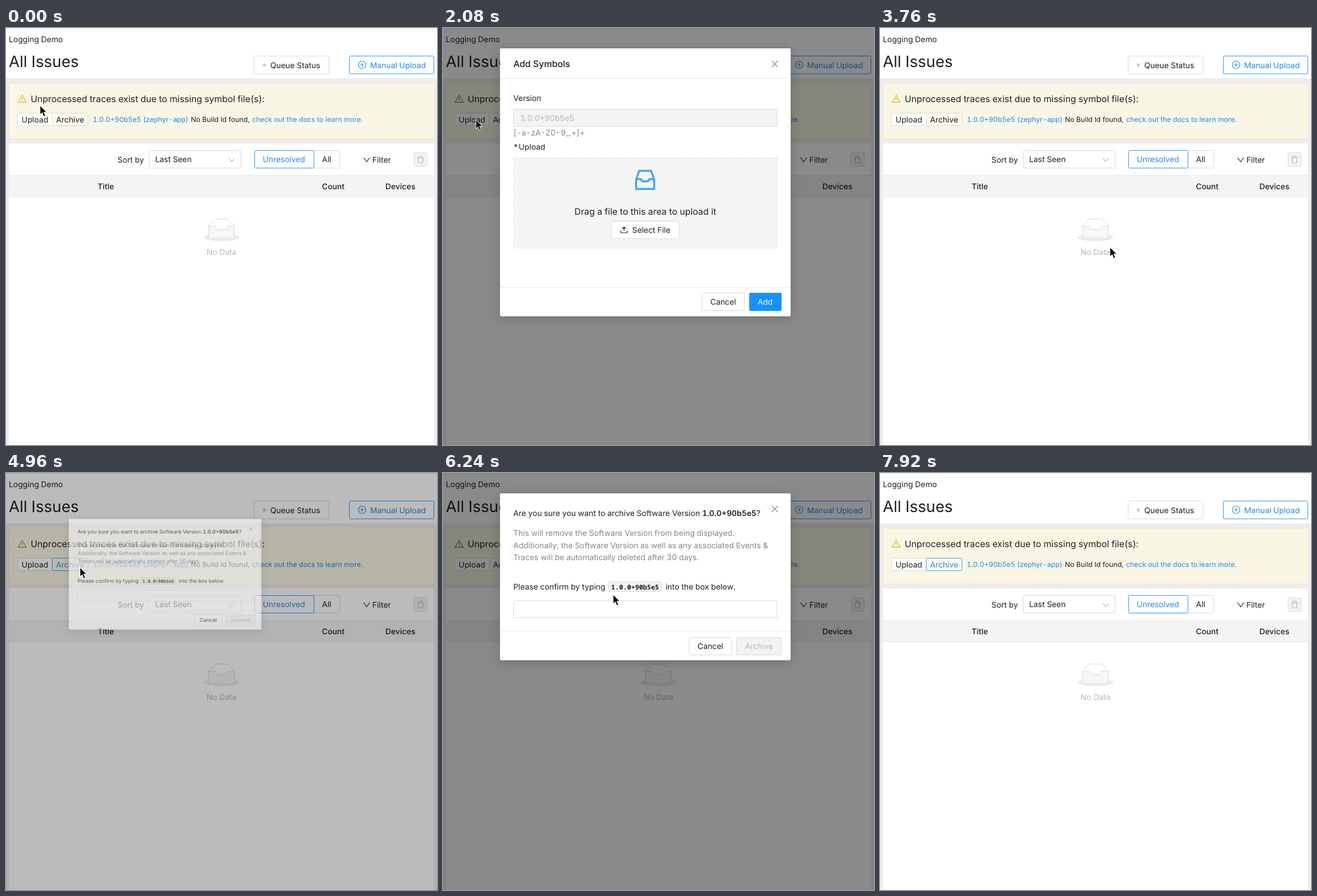
An HTML page that plays this animation: 760x737 px, repeating every 8 s.

```html
<!DOCTYPE html>
<html lang="en">
<head>
<meta charset="utf-8">
<title>All Issues</title>
<style>
html, body { margin: 0; height: 100%; overflow: hidden; }
svg { display: block; }
text {
  font: 13.85px Inter, sans-serif; font-optical-sizing: none; font-variant-numeric: tabular-nums;
  fill: #1f1f1f; text-rendering: geometricPrecision; white-space: pre;
}
.h1 { font-size: 27.6px; }
.big { font-size: 15.8px; }
.small { font-size: 12.35px; }
.medium { font-weight: 500; }
.mid { text-anchor: middle; }
.blue { fill: #1f8ae8; }
.grey { fill: #858585; }
.pale { fill: #b8b8b8; }
.white { fill: #fff; }
.line { fill: none; stroke: #222; stroke-width: 1.2; }
.box { fill: #fff; stroke: #d9d9d9; }
.off { fill: #f3f3f3; stroke: #d9d9d9; }
.primary { stroke: #2b93ee; }
.rule { stroke: #e8e8e8; }
.btn { --h: 0; }
.btn rect { stroke: color-mix(in srgb, #40a0f5 calc(var(--h) * 100%), #d9d9d9); }
.btn text { fill: color-mix(in srgb, #2b8fea calc(var(--h) * 100%), #1f1f1f); }
.warn { fill: none; stroke: color-mix(in srgb, #777 calc(var(--m) * 100%), #e0b62c); stroke-width: 1.3; }
.code { font: bold 11.7px "Noto Sans Mono", monospace; }
.sheet { fill: #fff; filter: drop-shadow(0 4px 10px #0003); }
</style>
</head>
<body>
<svg id="stage" width="760" height="737" viewBox="0 0 760 737">
  <rect width="760" height="737" fill="#ededed"/>
  <rect y="1.5" width="760" height="87.5" fill="#fff"/>
  <text x="5" y="25">Logging Demo</text>
  <text class="h1" x="5" y="69">All Issues</text>
  <rect class="box" x="437.5" y="49.5" width="132" height="31.5" rx="2"/>
  <circle cx="455.5" cy="65.5" r="3" fill="#d0d0d0"/>
  <text x="466" y="70.5">Queue Status</text>
  <rect class="box primary" x="605.5" y="49.5" width="149" height="31.5" rx="2"/>
  <path class="line primary" d="M621.5 65a6.5 6.5 0 1 0 13 0a6.5 6.5 0 1 0-13 0M624.7 65h6.6M628 61.7v6.6"/>
  <text class="blue" x="642" y="70.5">Manual Upload</text>

  <rect x="5.5" y="97.5" width="749.5" height="98.5" rx="2" fill="#f9f6e5" stroke="#f1e8bd"/>
  <path class="warn" d="M28.5 118.7L35.6 131.3H21.4ZM28.5 123v4M28.5 128v1.5"/>
  <text class="big" x="43.5" y="131">Unprocessed traces exist due to missing symbol file(s):</text>
  <g class="btn" id="upload">
    <rect x="20.5" y="150.5" width="61" height="22" rx="2" fill="#fff"/>
    <text class="mid" x="51" y="166.5">Upload</text>
  </g>
  <g class="btn" id="archive">
    <rect x="81.5" y="150.5" width="63" height="22" rx="2" fill="#faf8ee"/>
    <text class="mid" x="113" y="166.5">Archive</text>
  </g>
  <text class="small blue" x="153" y="166">1.0.0+90b5e5 (zephyr-app)</text>
  <text class="small" x="326" y="166">No Build Id found,</text>
  <text class="small blue" x="434" y="166">check out the docs to learn more.</text>

  <rect x="5.5" y="204" width="749" height="533" fill="#fff"/>
  <text x="196.5" y="237.5">Sort by</text>
  <rect class="box" x="252.5" y="216.5" width="162" height="31" rx="2"/>
  <text x="263" y="237">Last Seen</text>
  <path class="line" style="stroke:#b5b5b5" d="M393 230l5 6.5l5-6.5"/>
  <rect class="box" x="542.5" y="216.5" width="46" height="31" rx="2"/>
  <rect class="box primary" x="438.5" y="216.5" width="104.5" height="31" rx="2"/>
  <text class="blue mid" x="490" y="237">Unresolved</text>
  <text class="mid" x="565.5" y="237">All</text>
  <path class="line" d="M630.5 229l5.5 7.5l5.5-7.5"/>
  <text x="646" y="237.5">Filter</text>
  <rect class="off" x="719.5" y="220.5" width="23" height="24" rx="2"/>
  <path class="line" style="stroke:#b8b8b8" d="M725 229.5h12M726.5 229.5l.8 9h7.4l.8-9M728.5 229v-2.5h5v2.5"/>
  <rect x="5.5" y="260.5" width="749" height="38" fill="#f4f4f4"/>
  <path class="rule" d="M5.5 260.5h749M5.5 298.5h749"/>
  <text class="medium" x="161.5" y="284.5">Title</text>
  <text class="medium" x="557" y="284.5">Count</text>
  <text class="medium" x="669" y="284.5">Devices</text>
  <g transform="translate(348.5 337.5) scale(.985)" stroke="#d9d9d9">
    <ellipse cx="32" cy="33" rx="32" ry="7" fill="#ededed" stroke="none"/>
    <path fill="#fff" d="M55 13L45 1.3Q44 0 43 0H21Q20 0 19 1.3L9 13V22H55Z"/>
    <path fill="#f7f7f7" d="M41.6 16q0-3 2.3-3H55V31q0 4-3 4H12q-3 0-3-4V13H20q2.4 0 2.4 3t2.2 2.9H39.4q2.2 0 2.2-2.9Z"/>
  </g>
  <text class="pale mid" x="380" y="401">No Data</text>

  <rect id="mask" width="760" height="737"/>

  <g id="addDialog">
    <rect class="sheet" x="100.5" y="36" width="512.5" height="473.5" rx="2"/>
    <path class="rule" d="M100.5 89.5h512.5M100.5 458.5h512.5"/>
    <path class="line" style="stroke:#888" d="M580 58l10.5 11M590.5 58l-10.5 11"/>
    <text class="big medium" x="124" y="68.5">Add Symbols</text>
    <text x="124" y="129">Version</text>
    <rect class="off" x="124.5" y="143.5" width="465" height="30.5" rx="2"/>
    <text class="pale" x="136" y="164">1.0.0+90b5e5</text>
    <text class="grey" x="124" y="190">[-a-zA-Z0-9_.+]+</text>
    <text x="124" y="215">*</text>
    <text x="133.5" y="215">Upload</text>
    <rect x="124.5" y="229" width="465" height="160" rx="2" fill="#f4f6f6" stroke="#d9d9d9" stroke-dasharray="2 2"/>
    <path class="line" style="stroke:#43a5f5;stroke-width:3.5;stroke-linejoin:round" d="M340.5 268L346 252.5H367L372.5 268V284.5H340.5ZM340.5 267H348.5L352 271H361L364.5 267H372.5"/>
    <text class="big mid" x="356.7" y="330">Drag a file to this area to upload it</text>
    <rect class="box" x="297" y="341.5" width="119.5" height="31" rx="2"/>
    <path class="line" d="M313.5 358v4h11.5v-4M319.2 359v-7M316 355l3.2-3.4l3.2 3.4"/>
    <text x="333.5" y="361.5">Select File</text>
    <g class="btn" id="addCancel">
      <rect x="456.5" y="468.5" width="75" height="31" rx="2" fill="#fff"/>
      <text class="mid" x="494" y="489">Cancel</text>
    </g>
    <rect x="540" y="468" width="57" height="32" rx="2" fill="#1890ff"/>
    <text class="white mid" x="568" y="489">Add</text>
  </g>

  <g id="archiveDialog">
    <rect class="sheet" x="100.5" y="36" width="512.5" height="295" rx="2"/>
    <path class="rule" d="M100.5 279.5h512.5"/>
    <path class="line" style="stroke:#888" d="M580 58l10.5 11M590.5 58l-10.5 11"/>
    <text x="124" y="75.5">Are you sure you want to archive Software Version <tspan font-weight="600">1.0.0+90b5e5</tspan>?</text>
    <text class="grey" x="124" y="111">This will remove the Software Version from being displayed.</text>
    <text class="grey" x="124" y="133">Additionally, the Software Version as well as any associated Events &amp;</text>
    <text class="grey" x="124" y="154">Traces will be automatically deleted after 30 days.</text>
    <text x="124" y="206">Please confirm by typing</text>
    <rect class="off" x="291.5" y="192" width="94.5" height="17.5" rx="3"/>
    <text class="code mid" x="338.7" y="206">1.0.0+90b5e5</text>
    <text x="392.5" y="206">into the box below.</text>
    <rect class="box" x="124.5" y="225.5" width="464.5" height="30" rx="2"/>
    <g class="btn" id="archiveCancel">
      <rect x="434" y="290.5" width="75" height="31" rx="2" fill="#fff"/>
      <text class="mid" x="471.5" y="311">Cancel</text>
    </g>
    <rect class="off" x="517.5" y="290.5" width="79" height="31" rx="2"/>
    <text class="pale mid" x="557" y="311">Archive</text>
  </g>

  <g id="cursor" stroke-linejoin="round">
    <path id="arrow" fill="#000" stroke="#fff" d="M0 0V16.2L3.8 12.7L6.7 19.5L9.5 18.3L6.6 11.7H11.6Z"/>
    <path id="hand" fill="#fff" stroke="#000" stroke-width="1.2" d="M0 1.5Q1.5-1 3 1.5L5 7.5Q7 6 8 8Q10 6.5 11 8.7Q13.2 8 13.5 10.5L14 15Q13.6 17 12.5 18.5V21H4.5V19Q1 15.5-3.5 11.5Q-4.2 9-1.5 9.5L2 12ZM6.3 14v4M8.6 14v4M10.9 14v4"/>
  </g>
</svg>
<script>
const LOOP = 8000, STEP = 80;
const el = id => document.getElementById(id);
const clamp = v => Math.min(1, Math.max(0, v));
const smooth = u => u * u * (3 - 2 * u);

// time, x, y of the pointer tip
const path = [
  [0, 60, 137], [320, 58, 163], [640, 60, 163], [880, 110, 164], [1000, 110, 164], [1200, 58, 163],
  [1520, 58, 163], [2240, 58, 162], [3040, 512, 473], [3440, 512, 473], [4360, 130.5, 167],
  [5360, 130.5, 167], [6000, 300, 215], [6240, 300, 215], [6960, 450, 306], [7440, 458, 321],
  [7520, 458, 321], [7880, 458, 800], [LOOP, 458, 800]
];
const handTimes = [[240, 1600], [3000, 3520], [4240, 4960], [6880, 7520]];
const hovers = {
  upload: [[240, 720], [1000, 1520]],
  archive: [[720, 1140], [4240, 5160], [7600, 9000]],
  addCancel: [[2960, 3600]],
  archiveCancel: [[6880, 7600]]
};
const dialogs = [
  { id: 'addDialog', open: 1520, close: 3520, x: 58, y: 165 },
  { id: 'archiveDialog', open: 4880, close: 7520, x: 131, y: 170 }
];

function pointerAt(t) {
  const i = path.findIndex(k => k[0] > t);
  const [t0, x0, y0] = path[i - 1], [t1, x1, y1] = path[i];
  const u = smooth((t - t0) / (t1 - t0));
  return [x0 + (x1 - x0) * u, y0 + (y1 - y0) * u];
}

function draw(t) {
  for (const id in hovers) {
    const h = hovers[id].reduce((sum, [a, b]) => sum + clamp((t - a) / 240) - clamp((t - b) / 240), 0);
    el(id).style.setProperty('--h', clamp(h));
  }
  let shade = 0;
  for (const { id, open, close, x, y } of dialogs) {
    const shown = 1 - (1 - clamp((t - open) / 320)) ** 3;
    const k = shown * (1 - smooth(clamp((t - close) / 240)));
    const scale = 0.2 + 0.8 * k;
    el(id).setAttribute('transform', `translate(${x} ${y}) scale(${scale}) translate(${-x} ${-y})`);
    el(id).style.opacity = k;
    shade += k;
  }
  el('mask').style.opacity = 0.46 * shade;
  el('stage').style.setProperty('--m', shade);
  const hand = handTimes.some(([a, b]) => t >= a && t < b);
  el('hand').style.display = hand ? '' : 'none';
  el('arrow').style.display = hand ? 'none' : '';
  el('cursor').setAttribute('transform', `translate(${pointerAt(t)})`);
}

function tick() {
  draw(Math.floor(performance.now() % LOOP / STEP) * STEP);
  requestAnimationFrame(tick);
}
tick();
</script>
</body>
</html>
```
